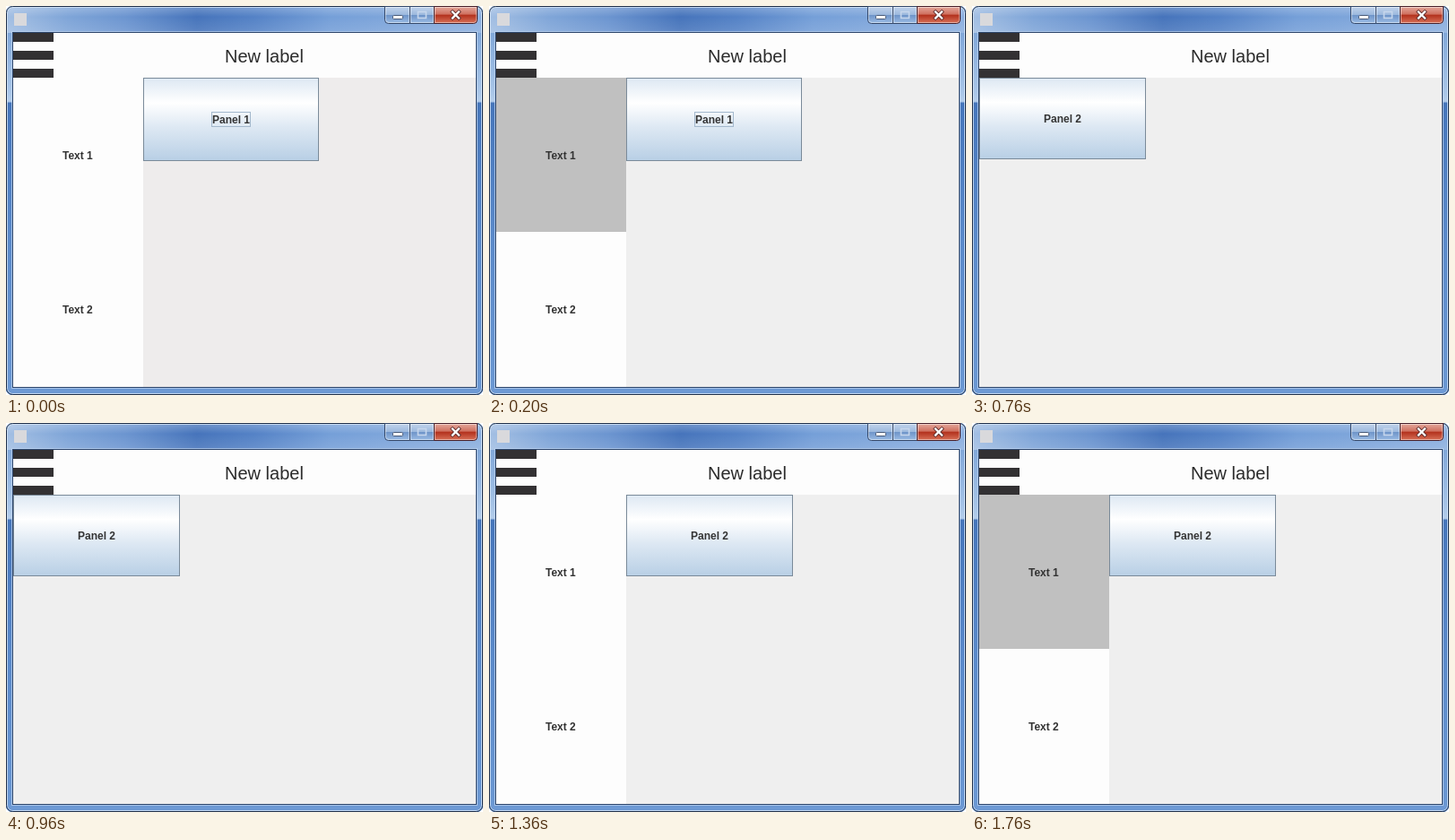
Animation, 532 px wide and 434 px high, one loop 1.88 s. Source, as an HTML page:

```html
<!DOCTYPE html>
<html lang="en">
<head>
<meta charset="utf-8">
<title>Sliding menu</title>
<style>
html, body { margin: 0; width: 100%; height: 100%; overflow: hidden; background: #fff; }
svg { display: block; width: 532px; height: 434px; }
text { font: bold 12px "Liberation Sans", Arial, sans-serif; fill: #333; }
.title { font-size: 20px; font-weight: normal; fill: #2b2b2b; }
.btn { fill: url(#metal); stroke: #7a8a99; }
.row { fill: #c0c0c0; }

/* one loop is 1880 ms; every change is a hard cut */
.body, .menu, .hot1, .hot2, .p1, .p2 { animation: 1880ms step-end infinite; }
.body { animation-name: body; }
.menu { animation-name: menu; }
.hot1 { animation-name: hot1; }
.hot2 { animation-name: hot2; }
.p1 { animation-name: p1; }
.p2 { animation-name: p2; }
@keyframes body { 0% { fill: #eeecec; } 6.383%, 100% { fill: #efefef; } }
@keyframes menu { 0% { opacity: 1; } 40.426% { opacity: 0; } 72.34%, 100% { opacity: 1; } }
@keyframes hot1 { 0% { opacity: 0; } 6.383% { opacity: 1; } 27.66% { opacity: 0; } 82.979%, 100% { opacity: 1; } }
@keyframes hot2 { 0% { opacity: 0; } 27.66% { opacity: 1; } 40.426%, 100% { opacity: 0; } }
@keyframes p1 { 0% { opacity: 1; } 40.426%, 100% { opacity: 0; } }
@keyframes p2 {
  0% { opacity: 0; transform: translateX(0); }
  40.426% { opacity: 1; transform: translateX(0); }
  72.34%, 100% { opacity: 1; transform: translateX(145px); }
}
</style>
</head>
<body>
<svg viewBox="0 0 532 434">
  <defs>
    <linearGradient id="metal" x2="0" y2="1">
      <stop offset="0" stop-color="#dde8f3"/>
      <stop offset=".3" stop-color="#fff"/>
      <stop offset=".6" stop-color="#dde8f3"/>
      <stop offset="1" stop-color="#b8cfe5"/>
    </linearGradient>
    <linearGradient id="bar">
      <stop offset="0" stop-color="#a3bfe3"/>
      <stop offset=".13" stop-color="#7fa5d8"/>
      <stop offset=".25" stop-color="#6c95d0"/>
      <stop offset=".4" stop-color="#4674bb"/>
      <stop offset=".52" stop-color="#5482c6"/>
      <stop offset=".68" stop-color="#759fd8"/>
      <stop offset="1" stop-color="#8db0df"/>
    </linearGradient>
    <linearGradient id="side" x2="0" y2="1">
      <stop offset="0" stop-color="#6f9ad2"/>
      <stop offset=".22" stop-color="#a9c6e8"/>
      <stop offset=".245" stop-color="#b4cdeb"/>
      <stop offset=".25" stop-color="#4676bb"/>
      <stop offset=".6" stop-color="#5b8aca"/>
      <stop offset="1" stop-color="#6b98d3"/>
    </linearGradient>
    <linearGradient id="gloss" x2="0" y2="1">
      <stop offset="0" stop-color="#fff" stop-opacity=".25"/>
      <stop offset=".4" stop-color="#fff" stop-opacity="0"/>
      <stop offset="1" stop-color="#fff" stop-opacity=".12"/>
    </linearGradient>
    <linearGradient id="glass" x2="0" y2="1">
      <stop offset="0" stop-color="#c3d5ec"/>
      <stop offset=".48" stop-color="#9db9de"/>
      <stop offset=".5" stop-color="#6d93c8"/>
      <stop offset="1" stop-color="#9cbde5"/>
    </linearGradient>
    <linearGradient id="red" x2="0" y2="1">
      <stop offset="0" stop-color="#e5ab9f"/>
      <stop offset=".46" stop-color="#cf6f5e"/>
      <stop offset=".5" stop-color="#b2301c"/>
      <stop offset="1" stop-color="#d9735a"/>
    </linearGradient>
    <clipPath id="frame"><rect width="532" height="434" rx="7"/></clipPath>
  </defs>

  <g clip-path="url(#frame)">
    <rect width="532" height="434" fill="url(#side)"/>
    <rect width="532" height="30" fill="url(#bar)"/>
    <rect width="532" height="30" fill="url(#gloss)"/>
    <rect y="426" width="532" height="8" fill="#6d99d4"/>
  </g>
  <rect x="1.5" y="1.5" width="529" height="431" rx="6" fill="none" stroke="#d5e5f7" stroke-opacity=".8"/>
  <rect x=".5" y=".5" width="531" height="433" rx="7" fill="none" stroke="#20304a"/>
  <rect x="6.5" y="28.5" width="519" height="398" fill="none" stroke="#bfd5ef" stroke-opacity=".7"/>
  <rect x="7.5" y="29.5" width="517" height="396" fill="none" stroke="#2c456b"/>

  <rect x="9" y="8" width="14" height="14" fill="#d9d9dc"/>

  <g stroke="#34486a">
    <path d="M422.5 .5H450.5V19.5H426.5Q422.5 19.5 422.5 15.5Z" fill="url(#glass)"/>
    <path d="M450.5 .5H477.5V19.5H450.5Z" fill="url(#glass)"/>
    <path d="M477.5 .5H525.5V15.5Q525.5 19.5 521.5 19.5H477.5Z" fill="url(#red)" stroke="#47202a"/>
  </g>
  <g fill="none" stroke="#fff" stroke-opacity=".45">
    <path d="M423.5 1.5H449.5V18.5H427.5Q423.5 18.5 423.5 15.5Z"/>
    <path d="M451.5 1.5H476.5V18.5H451.5Z"/>
    <path d="M478.5 1.5H524.5V15.5Q524.5 18.5 521.5 18.5H478.5Z"/>
  </g>
  <rect x="431.5" y="10.5" width="11" height="4" rx="1" fill="#fff" stroke="#485a78"/>
  <rect x="459.5" y="6.5" width="9" height="7" fill="none" stroke="#c6d6ec" stroke-width="1.6"/>
  <g fill="none">
    <path d="M498 6.5L505 13.5M505 6.5L498 13.5" stroke="#5c2a2a" stroke-width="4" stroke-linecap="square"/>
    <path d="M498 6.5L505 13.5M505 6.5L498 13.5" stroke="#fff" stroke-width="2.3" stroke-linecap="square"/>
  </g>

  <rect class="body" x="8" y="80" width="516" height="345" fill="#efefef"/>
  <rect x="8" y="30" width="516" height="50" fill="#fdfdfd"/>
  <path d="M8 30h45v10H8zM8 50h45v10H8zM8 70h45v10H8z" fill="#333133"/>
  <text class="title" x="244" y="63">New label</text>

  <g class="menu">
    <rect x="8" y="80" width="145" height="345" fill="#fdfdfd"/>
    <rect class="row hot1" x="8" y="80" width="145" height="172"/>
    <rect class="row hot2" x="8" y="252" width="145" height="172"/>
    <text x="63" y="171">Text 1</text>
    <text x="63" y="343">Text 2</text>
  </g>

  <g class="p1">
    <rect class="btn" x="153.5" y="80.5" width="195" height="92"/>
    <rect x="229.5" y="118.5" width="43" height="16" fill="none" stroke="#a3b8cc"/>
    <text x="230" y="131">Panel 1</text>
  </g>
  <g class="p2">
    <rect class="btn" x="8.5" y="80.5" width="185" height="90"/>
    <text x="80" y="130">Panel 2</text>
  </g>
</svg>
</body>
</html>
```
